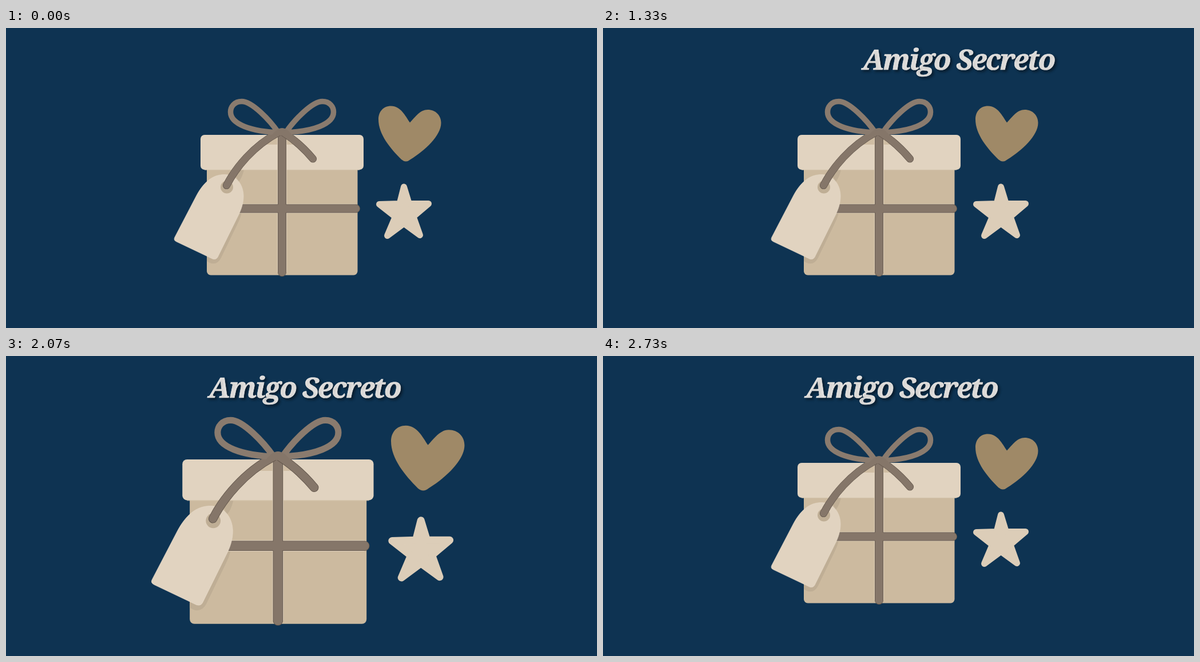
An HTML page that plays this animation: 1033 px wide and 525 px high, repeating every 5.65 s.

```html
<!DOCTYPE html>
<html lang="pt">
<meta charset="utf-8">
<title>Amigo Secreto</title>
<style>
  html, body { margin: 0; height: 100%; overflow: hidden; background: #0e3352; }
  svg { display: block; width: 100%; height: 100%; }
  #title {
    font: italic bold 50px "Noto Serif", serif;
    letter-spacing: -2.2px;
    text-anchor: middle;
    fill: #e8e6e4;
    stroke: #e8e6e4;
    stroke-width: .7px;
    text-shadow: 3px 3px 4px rgba(0, 0, 0, .45);
  }
  .line { fill: none; stroke-linecap: round; stroke-linejoin: round; }
</style>
<svg viewBox="0 0 1033 525">
  <defs>
    <path id="bands" d="M482.5 186V427.5M405 316H611.5"/>
    <path id="string" d="M385.5 275.5C401 245 432 206.500 476 183M485 183Q514 202 536.5 229"/>
    <path id="bow" d="M476 183C461 161 430 128.500 412 128.500C399 128.500 392.500 138 392.500 147C392.500 168 428 181.500 480 183
      M489 183C504 161 535 128.500 553 128.500C566 128.500 572.500 138 572.500 147C572.500 168 537 181.500 485 183"/>
  </defs>
  <g id="gift">
    <rect x="351" y="235" width="263.500" height="197.500" rx="7" fill="#ccba9f"/>
    <g fill="#bfae95">
      <path d="M398 248H416Q413 262 406 270Z"/>
      <path d="M413 312Q413 326 405 342L376 402Q369 416 356 411L351 408V390Z"/>
    </g>
    <rect x="340" y="187" width="285" height="61" rx="7" fill="#e1d3c0"/>
    <path d="M347 248.300H618" stroke="#d8c8b1" stroke-width=".8"/>
    <path d="M466 188H499L506 204H455Z" fill="#cfbda3"/>
    <use href="#bands" stroke="#e0d2bd" stroke-width="16.600"/>
    <g class="line">
      <use href="#bands" stroke="#5f5348" stroke-width="15"/>
      <use href="#bands" stroke="#857669" stroke-width="13.600"/>
    </g>
    <path d="M295 366L333 293C345 271 360 256.500 382 256.500C403 256.500 415 275 415 294C415 305 412 316 407 326L370 401Q367 406 361 404L298 374Q292 371 295 366Z"
      fill="#e1d3c0" stroke="#e8dccb" stroke-width=".6"/>
    <circle cx="386" cy="278.500" r="11" fill="#bfae95"/>
    <g class="line">
      <use href="#string" stroke="#5f5348" stroke-width="13.200"/>
      <use href="#string" stroke="#857669" stroke-width="11.800"/>
      <use href="#bow" stroke="#8a7b6e" stroke-width="9.500"/>
    </g>
    <path d="M464 188Q474 175 482.500 175Q491 175 501 188Z" fill="#857669"/>
    <path d="M706 165.500C698 154 690 136.500 673 136.500C659 136.500 651 147 651 160C651 186 672 211 691 230Q699 237 707 230C733 214 760.500 188 760.500 166C760.500 153 751 143 737 143C724 143 716 155 706 165.500Z"
      fill="#9f8967"/>
    <path class="line" d="M695.500 278L704.500 307.500L738.500 307.500L712 330L723.500 362.500L695.500 342L666.500 363.500L680.500 330.500L652.500 308.500L688 307.500Z"
      style="fill:#dccdb8" stroke="#dccdb8" stroke-width="11"/>
  </g>
  <text id="title" x="522" y="73">Amigo Secreto</text>
</svg>
<script>
  const LOOP = 5650, START = 662, STEP = 200 / 3;
  const SLIDE_END = 18, GROW_STEPS = 9, GROWTH = 0.3;
  const PIVOT_X = 523.6, PIVOT_Y = 222;
  const title = document.getElementById("title");
  const gift = document.getElementById("gift");

  // cubic-bezier(.25, .1, .25, 1)
  function ease(p) {
    const curve = (u, a, b) => 3 * u * (1 - u) ** 2 * a + 3 * u * u * (1 - u) * b + u ** 3;
    let low = 0, high = 1;
    for (let i = 0; i < 24; i++) {
      const mid = (low + high) / 2;
      if (curve(mid, 0.25, 0.25) < p) low = mid; else high = mid;
    }
    return curve(low, 0.1, 1);
  }

  function draw(now) {
    const step = Math.floor((now % LOOP - START) / STEP);
    const left = Math.max(0, SLIDE_END - step);
    const offset = left ** 2 * (1.44 + 0.00178 * left ** 2);
    title.setAttribute("transform", `translate(${offset} 0)`);

    const grow = (step - SLIDE_END) / GROW_STEPS;
    const scale = grow > 0 && grow <= 1 ? 1 + GROWTH * ease(grow) : 1;
    gift.setAttribute("transform",
      `translate(${PIVOT_X} ${PIVOT_Y}) scale(${scale}) translate(${-PIVOT_X} ${-PIVOT_Y})`);
  }

  const origin = performance.now();
  function tick() {
    draw(performance.now() - origin);
    requestAnimationFrame(tick);
  }
  tick();
</script>
</html>
```
